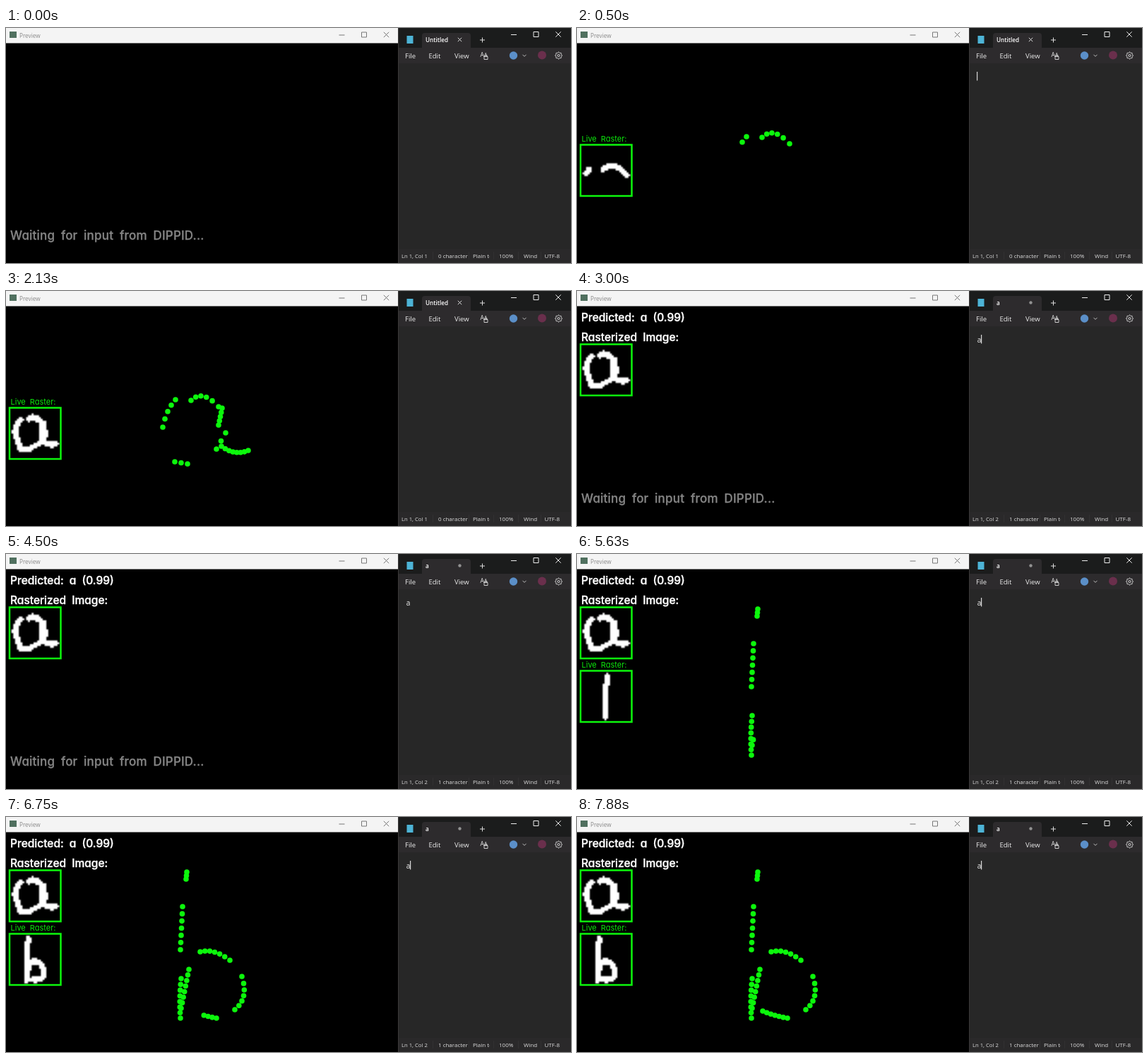
Write an HTML page with a canvas that moves like this. It is 800 by 333 pixels and loops after 8000 ms.

```html
<!DOCTYPE html>
<html lang="en">
<head>
<meta charset="utf-8">
<title>Handwriting input</title>
<style>
  html, body { margin: 0; width: 100%; height: 100%; overflow: hidden; background: #000; }
  canvas, svg { position: absolute; left: 0; top: 0; width: 800px; height: 333px; }
  svg text {
    font: 500 15.5px Inter, sans-serif;
    font-feature-settings: "cv11";
    word-spacing: 4px;
    fill: #fff;
    stroke: #fff;
    stroke-width: .4px;
  }
  svg #waiting { font-size: 17px; letter-spacing: .2px; fill: #858585; stroke: #858585; stroke-width: .3px; }
  svg #live { font-size: 11px; font-weight: 400; word-spacing: 3px; fill: #0ce80c; stroke: none; }
</style>
</head>
<body>
<canvas id="stage" width="800" height="333"></canvas>
<svg viewBox="0 0 800 333">
  <g id="result">
    <text x="6" y="43">Predicted: a (0.99)</text>
    <text x="6" y="71">Rasterized Image:</text>
  </g>
  <text id="live" x="6.5" y="160.5">Live Raster:</text>
  <text id="waiting" x="6" y="299.5">Waiting for input from DIPPID...</text>
</svg>
<script>
const LOOP = 8000, STEP = 125, TYPED = 2875, BLINK = 1080;
const GREEN = '#0cf70c';
const ctx = document.getElementById('stage').getContext('2d');
const small = document.createElement('canvas');
small.width = small.height = 28;
const grid = small.getContext('2d', { willReadFrequently: true });

const mix = (a, b, k) => a + (b - a) * k;

// Dots along a quadratic curve; without a bend it is a straight line
function dots(n, from, to, bend = [mix(from[0], to[0], .5), mix(from[1], to[1], .5)]) {
  return Array.from({ length: n }, (_, i) => {
    const k = i / (n - 1);
    return [0, 1].map(d => mix(mix(from[d], bend[d], k), mix(bend[d], to[d], k), k));
  });
}

const letterA = {
  start: 250, written: 2125, end: TYPED, ease: .61, lift: 6,
  points: [
    dots(6, [301, 164], [262, 155], [278, 139]),
    dots(5, [240, 154], [222, 193], [227, 168]),
    dots(3, [239, 242], [257, 245]),
    dots(3, [298, 224], [311, 201]),
    dots(5, [306, 166], [301, 190]),
    dots(8, [305, 220], [343, 226], [324, 234])
  ].flat()
};

const letterB = {
  start: 4875, written: 6875, end: LOOP, ease: .86, lift: -1,
  points: [
    dots(3, [256, 78], [255, 88]),
    dots(7, [250, 127], [247, 188]),
    dots(8, [248, 229], [247, 285], [245, 258]),
    dots(8, [248, 271], [259, 216]),
    dots(7, [275, 191], [317, 203], [295, 186]),
    dots(7, [334, 226], [324, 273], [344, 257]),
    dots(7, [298, 285], [263, 275], [280, 282])
  ].flat()
};

function writtenPoints({ start, written, ease, points }, t) {
  const k = Math.min(1, (t - start) / (written - start));
  return points.slice(0, Math.max(1, Math.floor(points.length * k ** ease)));
}

function rect(x, y, w, h, color) {
  ctx.fillStyle = color;
  ctx.fillRect(x, y, w, h);
}

function disc(x, y, r, color) {
  ctx.fillStyle = color;
  ctx.beginPath();
  ctx.arc(x, y, r, 0, Math.PI * 2);
  ctx.fill();
}

function path(d, x, y, color, width = 1) {
  ctx.save();
  ctx.translate(x, y);
  ctx.strokeStyle = color;
  ctx.lineWidth = width;
  ctx.stroke(new Path2D(d));
  ctx.restore();
}

const cross = (x, y, r, color) => path(`M${-r} ${-r}L${r} ${r}M${r} ${-r}L${-r} ${r}`, x, y, color);

function gear(x, y, color) {
  ctx.strokeStyle = color;
  ctx.lineWidth = 1;
  ctx.beginPath();
  for (let a = 0; a < Math.PI * 2; a += Math.PI / 24) {
    const r = 4.4 + .6 * Math.cos(8 * a);
    ctx.lineTo(x + r * Math.cos(a), y + r * Math.sin(a));
  }
  ctx.closePath();
  ctx.moveTo(x + 1.6, y);
  ctx.arc(x, y, 1.6, 0, Math.PI * 2);
  ctx.stroke();
}

function label(text, x, y, size, color = '#eee', weight = 400, family = '"Open Sans", sans-serif') {
  ctx.font = `${weight} ${size}px ${family}`;
  ctx.fillStyle = color;
  ctx.fillText(text, x, y);
}

function windowButtons(x, y, color) {
  path('M-4 0H4', x, y + .5, color);
  path('M-3.5 -3.5H3.5V3.5H-3.5Z', x + 31.5, y, color);
  cross(x + 63, y, 3.7, color);
}

// Fits the written points into a 28 by 28 bitmap and shows it in a frame
function raster(points, lift, top) {
  const xs = points.map(p => p[0]), ys = points.map(p => p[1]);
  const x0 = Math.min(...xs), x1 = Math.max(...xs), y0 = Math.min(...ys), y1 = Math.max(...ys);
  const scale = 22.4 / Math.max(x1 - x0, y1 - y0, 8);
  const fit = ([x, y]) => [14 + (x - (x0 + x1) / 2) * scale, 14 + (y - (y0 + y1) / 2) * scale];
  const gap = (p, q) => Math.hypot(p[0] - q[0], p[1] - q[1]);

  grid.clearRect(0, 0, 28, 28);
  grid.lineWidth = 3;
  grid.lineCap = grid.lineJoin = 'round';
  grid.strokeStyle = '#fff';
  grid.beginPath();
  points.forEach((p, i) => {
    const broken = !i || i === lift || gap(p, points[i - 1]) * scale > 11.7;
    grid[broken ? 'moveTo' : 'lineTo'](...fit(p));
  });
  const last = points[points.length - 1];
  if (points.length > 14 && gap(last, points[0]) < 40) grid.lineTo(...fit(points[0]));
  grid.stroke();

  const image = grid.getImageData(0, 0, 28, 28);
  for (let i = 3; i < image.data.length; i += 4) image.data[i] = image.data[i] > 110 ? 255 : 0;
  grid.putImageData(image, 0, 0);

  ctx.drawImage(small, 5, top, 73, 73);
  ctx.strokeStyle = GREEN;
  ctx.lineWidth = 2.5;
  ctx.strokeRect(5, top, 72.5, 72.5);
}

function previewWindow() {
  rect(0, 0, 800, 333, '#000');
  rect(0, 0, 555, 21.5, '#f4f4f4');
  rect(5, 5, 10, 9, '#50705f');
  label('Preview', 19, 13.5, 8.2, '#8a8a8a');
  windowButtons(475.5, 9.5, '#777');
}

function caretVisible(t) {
  if (t < 500) return false;
  const since = t < TYPED ? 500 : TYPED;
  return t >= 5000 || (t - since) % BLINK < BLINK / 2;
}

function editorWindow(t) {
  const typed = t >= TYPED;
  rect(555, 0, 1, 333, '#3a3838');
  rect(556, 0, 244, 333, '#272727');
  rect(556, 0, 244, 28, '#1b1c1c');
  rect(556, 28, 244, 22, '#2d2b2d');
  rect(556, 313, 244, 20, '#2a292a');
  ctx.fillStyle = '#2d2b2d';
  ctx.beginPath();
  ctx.roundRect(589, 7, 69, 22, [4, 4, 0, 0]);
  ctx.fill();

  rect(567.5, 11, 9, 11, '#4db4d6');
  label(typed ? 'a' : 'Untitled', 594, 20, 8.2, '#fff', 600);
  if (typed) disc(642.5, 16.5, 2.2, '#929292');
  else cross(642.5, 16.5, 2.7, '#ddd');
  path('M-3.5 0H3.5M0 -3.5V3.5', 674.5, 17, '#ddd');
  windowButtons(719, 9, '#eee');

  label('File', 565, 43, 9.5);
  label('Edit', 598.5, 43, 9.5);
  label('View', 635, 43, 9.5);
  label('A', 671.5, 41, 8.5);
  label('A', 677, 40, 7);
  path('M0 0H5V4H0ZM1 0V-1.5H4V0', 677, 40.5, '#ddd', .9);
  disc(718.5, 39, 5.7, '#5b8fc8');
  path('M-2.5 -1.2L0 1.3L2.5 -1.2', 734, 39, '#bbb');
  disc(759, 38.5, 6, '#6a2f4c');
  gear(782.5, 39, '#ddd');

  if (typed) label('a', 566.5, 72.5, 10, '#e6e6e6', 400, '"Noto Sans Mono", monospace');
  if (caretVisible(t)) rect(typed ? 572 : 566, 62, 1.2, 12.5, '#d8d8d8');
  statusBar(typed ? 1 : 0);
}

function statusBar(typedCount) {
  const item = (text, x, size = 8) => label(text, x, 325.5, size, '#dcdcdc');
  item(`Ln 1, Col ${typedCount + 1}`, 560, 7.7);
  item(`${typedCount} character`, 612);
  ctx.save();
  ctx.beginPath();
  ctx.rect(656, 313, 29, 20);
  ctx.clip();
  item('Plain text', 661);
  ctx.restore();
  item('100%', 698);
  item('Wind', 733);
  item('UTF-8', 762.5);
  for (const x of [604, 655, 690, 725, 757]) rect(x, 317, 1, 11, '#323132');
}

const show = (id, on) => { document.getElementById(id).style.display = on ? '' : 'none'; };

function draw(now) {
  const t = Math.floor(now % LOOP / STEP) * STEP;
  previewWindow();
  editorWindow(t);

  const letter = [letterA, letterB].find(l => t >= l.start && t < l.end);
  if (t >= TYPED) raster(letterA.points, letterA.lift, 75.5);
  if (letter) {
    const points = writtenPoints(letter, t);
    raster(points, letter.lift, 165.5);
    for (const [x, y] of points) disc(x, y, 3.8, GREEN);
  }
  show('result', t >= TYPED);
  show('live', letter);
  show('waiting', !letter);
  requestAnimationFrame(draw);
}
requestAnimationFrame(draw);
</script>
</body>
</html>
```
